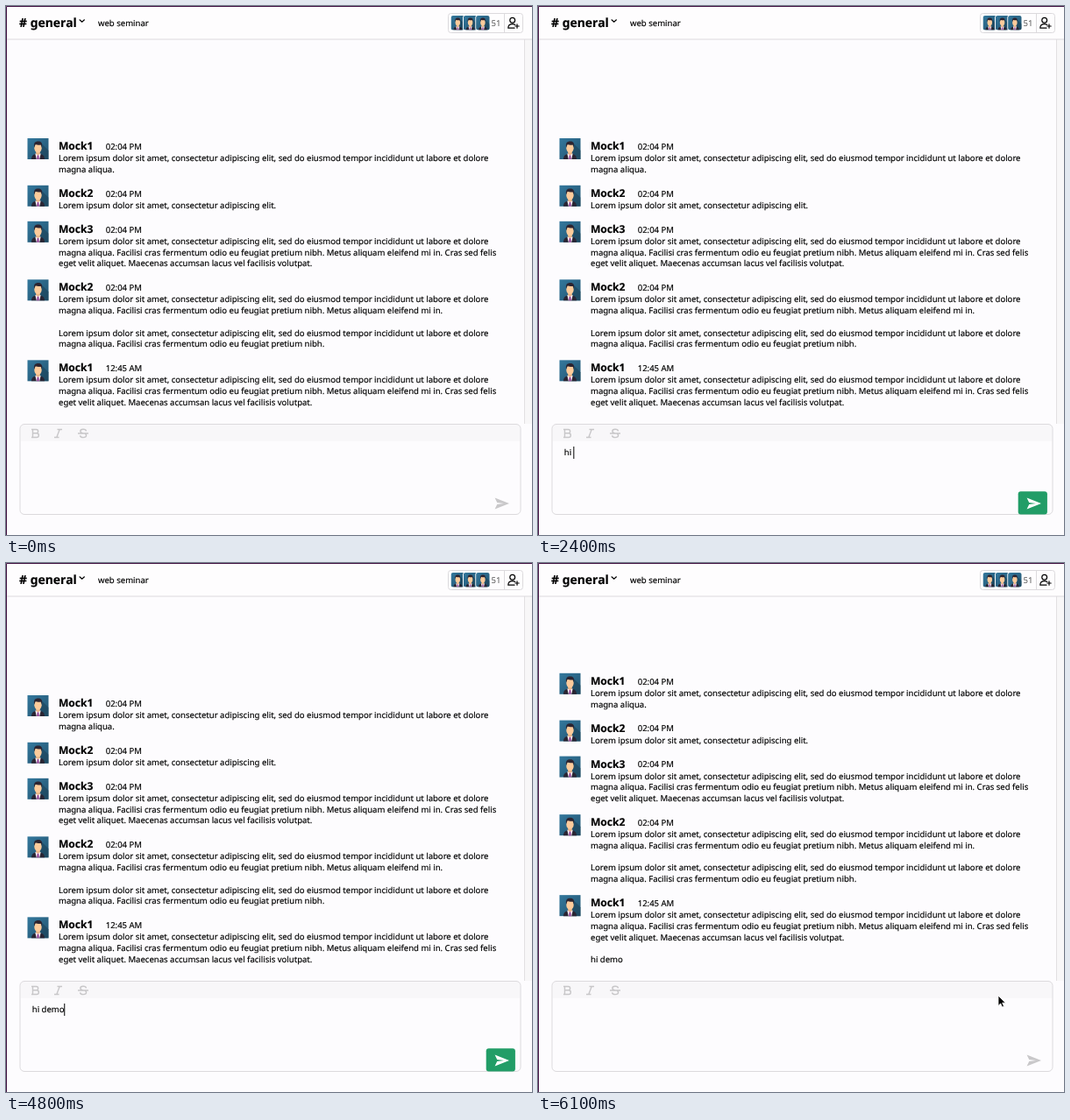
These frames come from a looping animation (600 px wide and 604 px high, 6200 ms). An HTML page:

```html
<!DOCTYPE html>
<html lang="en">
<head>
<meta charset="utf-8">
<title>Chat channel</title>
<style>
  html, body { margin: 0; width: 100%; height: 100%; overflow: hidden; background: #fdfcfe; }
  svg { display: block; }
  text {
    font: 9.54px "Noto Sans", sans-serif;
    fill: #000;
    stroke: #000;
    stroke-width: .16;
    white-space: pre;
    text-rendering: geometricPrecision;
  }
  .name { font-size: 12.05px; font-weight: 700; }
  .channel { font-size: 13.95px; font-weight: 700; }
  .count { fill: #555; stroke: none; }
  .line { fill: none; stroke: #dcdadd; }
  .tool { fill: none; stroke: #c8c7c9; stroke-width: 1.4; }
  .ink { fill: none; stroke: #000; stroke-width: 1.2; stroke-linecap: round; }
</style>
</head>
<body>
<svg width="600" height="604" viewBox="0 0 600 604">
  <defs>
    <linearGradient id="sky" x2="1" y2="1">
      <stop stop-color="#34789d"/>
      <stop offset="1" stop-color="#225470"/>
    </linearGradient>
    <g id="avatar">
      <rect width="24" height="24" fill="url(#sky)"/>
      <path d="M16 6L24 14V24H14Z" fill="#1c4359" opacity=".6"/>
      <path d="M4.500 24C4.500 20.500 6 19 9.500 17.800H14.500C18 19 19.500 20.500 19.500 24Z" fill="#2a2533"/>
      <path d="M8.800 17.600L10.300 24H13.700L15.200 17.600Z" fill="#f6f0f5"/>
      <path d="M11.200 19.200H12.800L13.300 24H10.700Z" fill="#8d3c93"/>
      <path d="M9.700 14H14.300V17.800L12 19.500L9.700 17.800Z" fill="#eab587"/>
      <ellipse cx="12" cy="11.300" rx="4.200" ry="5.400" fill="#fccb9b"/>
      <path d="M7.700 10.500C6.700 5.500 8.800 3.600 12.400 3.600C16 3.600 17.300 6.200 16.300 10.500L15.600 7.600C13 7.900 10.500 7.500 9 6.900Z" fill="#2c2430"/>
    </g>
    <clipPath id="soft"><rect width="24" height="24" rx="4"/></clipPath>
    <clipPath id="pane"><rect x="1" y="39" width="590" height="438"/></clipPath>
  </defs>

  <rect width="600" height="604" fill="#fdfcfe"/>

  <g clip-path="url(#pane)"><g id="messages"></g></g>

  <rect x="591" y="38" width="9" height="439" fill="#f8f7f8"/>
  <path class="line" d="M591.500 38V477" stroke-opacity=".8"/>

  <rect width="600" height="38" fill="#fefdfe"/>
  <path class="line" d="M0 38H600"/>
  <text class="channel" x="15" y="24"># general</text>
  <path class="ink" d="M84 15.800L86.700 18.300L89.400 15.800"/>
  <text x="105" y="22.900">web seminar</text>

  <rect class="line" x="504.500" y="8.500" width="85" height="22" rx="3"/>
  <path class="line" d="M568.500 8.500V30.500"/>
  <g id="members"></g>
  <text class="count" x="553.500" y="22.900">51</text>
  <g class="ink">
    <circle cx="577.700" cy="16.200" r="2.900"/>
    <path d="M572.800 25.200C572.800 22 574.500 20.600 577.700 20.600C579 20.600 580 20.900 580.800 21.400M572.800 25.200H580M583 20.800V25.200M580.800 23H585.200"/>
  </g>

  <path d="M0.500 604V0.500H600" fill="none" stroke="#3f0e40"/>

  <path d="M16.500 497V482Q16.500 477.500 21 477.500H582Q586.500 477.500 586.500 482V497Z" fill="#f8f7f9"/>
  <rect class="line" x="16" y="477.500" width="571" height="103" rx="5"/>
  <g class="tool">
    <path d="M29 483.500H34.500A2.100 2.100 0 0 1 34.500 487.800H30.500M34.500 487.800H35A2.300 2.300 0 0 1 35 492.500H29M30.500 483.500V492.500"/>
    <path d="M58.500 483.500H64M55 492.500H60.500M61.200 483.500L57.800 492.500"/>
    <path d="M82 488H94M91.500 485.300C91 482.500 84.800 482.500 84.800 485.600C84.800 487 86 487.600 88 488M84.500 490.300C85 493.500 91.600 493.400 91.600 490.300C91.600 489.200 91 488.500 90 488"/>
  </g>

  <rect id="button" x="547.700" y="554.200" width="33.200" height="26.200" rx="3" fill="#229d67"/>
  <path id="plane" d="M557.600 561.600L574 568L557.600 574.400L560.200 569L568 568L560.200 567Z"/>
  <text id="draft" x="29.800" y="513.200"></text>
  <rect id="caret" y="503" width="1" height="14" fill="#000"/>
  <path id="pointer" d="M0 0V11.500L2.700 9L4.500 13.100L6.500 12.200L4.700 8.200H8.300Z" fill="#000" stroke="#fff" stroke-width=".8"/>
</svg>
<script>
const LOOP = 6200, SENT = 5500, LINE = 12.74;
const $ = id => document.getElementById(id);

function add(parent, tag, attrs, text = "") {
  const el = document.createElementNS("http://www.w3.org/2000/svg", tag);
  for (const key in attrs) el.setAttribute(key, attrs[key]);
  el.textContent = text;
  return parent.appendChild(el);
}

const start = "Lorem ipsum dolor sit amet, consectetur adipiscing elit";
const first = start + ", sed do eiusmod tempor incididunt ut labore et dolore";
const second = "magna aliqua. Facilisi cras fermentum odio eu feugiat pretium nibh.";
const metus = second + " Metus aliquam eleifend mi in.";
const long = [first, metus + " Cras sed felis", "eget velit aliquet. Maecenas accumsan lacus vel facilisis volutpat."];

const chat = [
  ["Mock1", "02:04 PM", [first, "magna aliqua."]],
  ["Mock2", "02:04 PM", [start + "."]],
  ["Mock3", "02:04 PM", long],
  ["Mock2", "02:04 PM", [first, metus, "", first, second]],
  ["Mock1", "12:45 AM", long]
];

const box = $("messages");
const lineAt = (y, i, line) => add(box, "text", { x: 60, y: y + 13.1 + i * LINE }, line);

let y = 164, reply;
for (const [name, time, lines] of chat) {
  add(box, "use", { href: "#avatar", x: 24.5, y: y - 13 });
  add(box, "text", { class: "name", x: 60, y }, name);
  add(box, "text", { x: 113.7, y: y - .2 }, time);
  lines.forEach((line, i) => lineAt(y, i, line));
  if (time === "12:45 AM") reply = lineAt(y, 4, "hi demo");
  y += 28.3 + lines.length * LINE;
}

for (let i = 0; i < 3; i++) {
  const g = add($("members"), "g", { transform: `translate(${507.5 + i * 14.3} 11)` });
  add(g, "rect", { x: -.8, y: -.8, width: 17.2, height: 18.2, rx: 3.5, fill: "#fff" });
  add(g, "use", { href: "#avatar", transform: "scale(.65 .69)", "clip-path": "url(#soft)" });
}

// keystrokes of "hi demo", in ms
const keys = [1900, 2000, 2300, 3000, 3200, 3400, 3600];

// pointer path: time, x, y
const path = [
  [4900, 545, 581], [5000, 556, 575], [5200, 572, 564], [5400, 573, 562],
  [5500, 571, 562], [5800, 569, 564], [5900, 560, 549], [6000, 536, 511], [6100, 525, 494]
];

function pointerAt(t) {
  const i = path.findLastIndex(p => p[0] <= t);
  if (i < 0) return null;
  const a = path[i], b = path[i + 1] || a;
  const k = b === a ? 0 : (t - a[0]) / (b[0] - a[0]);
  return [a[1] + (b[1] - a[1]) * k, a[2] + (b[2] - a[2]) * k];
}

const show = (el, on) => el.setAttribute("visibility", on ? "visible" : "hidden");

function draw(ms) {
  const t = Math.floor(ms % LOOP / 100) * 100;
  const sent = t >= SENT;
  const typed = keys.filter(k => k <= t).length;
  const ready = typed > 0 && !sent;

  box.setAttribute("transform", `translate(0 ${sent ? -25.2 : 0})`);
  show(reply, sent);

  const draft = $("draft");
  draft.textContent = sent ? "" : "hi demo".slice(0, typed);
  show($("button"), ready);
  $("plane").setAttribute("fill", ready ? "#fff" : "#c9c8ca");

  const since = t - (typed ? keys[typed - 1] : 500);
  show($("caret"), !sent && since >= 0 && since % 1000 < 500);
  $("caret").setAttribute("x", 29.5 + (typed ? draft.getComputedTextLength() : 0));

  const at = pointerAt(t);
  show($("pointer"), at);
  if (at) $("pointer").setAttribute("transform", `translate(${at})`);
}

const t0 = performance.now();
function tick() {
  draw(performance.now() - t0);
  requestAnimationFrame(tick);
}
tick();
</script>
</body>
</html>
```
